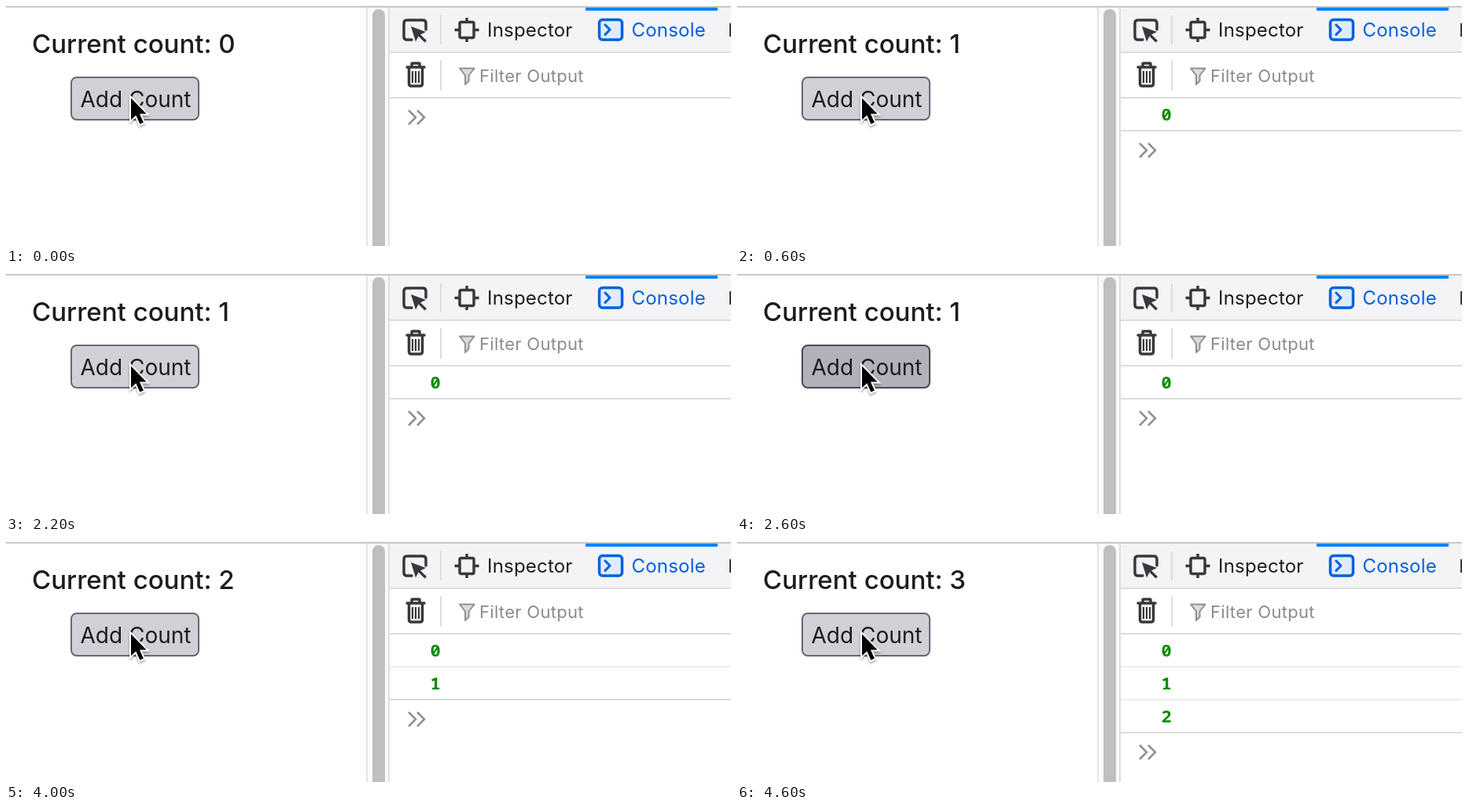
These frames come from a looping animation (922 px wide and 306 px high, 5000 ms). An HTML page:

```html
<!DOCTYPE html>
<html lang="en">
<head>
<meta charset="utf-8">
<title>Counter with console</title>
<style>
  html, body { margin: 0; width: 100%; height: 100%; overflow: hidden; background: #fff; }
  svg { display: block; width: 922px; height: 306px; }
  text { font-family: Inter, sans-serif; fill: #1c1c1f; white-space: pre; }
  .ui { font-size: 24px; letter-spacing: .2px; }
  .log text { font: 600 22px "Noto Sans Mono", monospace; fill: #058b00; }
  .line { fill: none; stroke: #38383d; stroke-width: 3.5; }
  .gray { fill: none; stroke: #8f8f94; stroke-width: 2.5; }
  #button rect { fill: #d0d0d7; stroke: #676774; stroke-width: 2; }
  #button.pressed rect { fill: #b1b1b9; stroke: #484851; }
</style>
</head>
<body>
<svg viewBox="0 0 922 306">
  <!-- page -->
  <text x="33" y="60" font-size="33" font-weight="500">Current count: <tspan id="count">0</tspan></text>
  <g id="button">
    <rect x="83" y="91" width="162" height="54" rx="7"/>
    <text x="94.5" y="129" font-size="28">Add Count</text>
  </g>
  <circle id="ring" cx="158" cy="120" r="42.5" fill="none" stroke="#000" stroke-width="3"/>
  <path d="M159 117.5V145l6.3-5.8 5 11.3 4.6-2-5-11h8.6z" stroke="#fff" stroke-width="4"
    paint-order="stroke" style="filter:drop-shadow(0 2px 1.5px #0005)"/>

  <!-- scrollbar -->
  <path d="M458 2h30v304h-30z" fill="#fafafa"/>
  <path d="M459 2v304" stroke="#e4e4e4" stroke-width="2"/>
  <path d="M487 2v304" stroke="#dedee1" stroke-width="2"/>
  <rect x="466" y="4" width="16" height="320" rx="8" fill="#bfbfbf"/>

  <!-- toolbars -->
  <path d="M488 2h434v56H488z" fill="#f4f4f6"/>
  <path d="M488 59h434M488 117h434M553 12v37M553 69v39" stroke="#dddde0" stroke-width="2"/>
  <path d="M0 1h922" stroke="#c8c8ca" stroke-width="2"/>
  <path d="M737 2h168v4H737z" fill="#0a84ff"/>
  <path d="M920 22h2v17h-2z" fill="#38383d"/>

  <!-- element picker -->
  <path class="line" d="M516 43h-6q-4 0-4-4V22q0-4 4-4h20q4 0 4 4v8" stroke-linecap="round"/>
  <path d="M515 26l19 7-7 3.5 8 7.5-2.5 2.5-8-8-3.5 7z" fill="#38383d"/>
  <!-- inspector -->
  <path class="line" stroke-width="3" d="M579 20.500h14q2 0 2 2v16q0 2-2 2h-14q-2 0-2-2v-16q0-2 2-2zM586 15v5M586 41v5M570.500 30.500h6M595.500 30.500h6"/>
  <text class="ui" x="612" y="39">Inspector</text>
  <!-- console -->
  <g fill="none" stroke="#0060df" stroke-width="3.5">
    <rect x="754.500" y="17.500" width="29" height="25.500" rx="4" fill="#dfecfc"/>
    <path d="M762 24l6 6.200-6 6.200" stroke-width="3" stroke-linecap="round" stroke-linejoin="round"/>
  </g>
  <text class="ui" x="795.500" y="39" style="fill:#0060df">Console</text>
  <!-- trash -->
  <path class="line" stroke-linecap="round" d="M510 78h22M516 77v-3q0-1 1-1h8q1 0 1 1v3M512.500 79v20q0 3 3 3h11q3 0 3-3V79"/>
  <path class="line" style="stroke-width:2.200" d="M517 83v15M521 83v15M525 83v15"/>
  <!-- filter -->
  <path class="gray" style="fill:#dcdce0;stroke-width:2" stroke-linejoin="round" d="M577 79.500h18.500l-7 9v7l-4.500 4.500V88.500z"/>
  <text x="602" y="97" font-size="22" letter-spacing=".3" style="fill:#8c8c90">Filter Output</text>

  <g class="log" id="log"></g>
  <path class="gray" id="prompt" d="M512 133l9 9-9 9M523 133l9 9-9 9"/>
</svg>
<script>
const ROW = 42, LOOP = 5000;
const get = id => document.getElementById(id);
// [press, ring hidden, count changes and release, logged]
const clicks = [[200, 400, 600, 600], [2400, 2600, 2800, 2800], [4200, 4400, 4400, 4600]];

function logRows(n) {
  let rows = '';
  for (let i = 0; i < n; i++) {
    const y = 117 + ROW * (i + 1);
    rows += `<text x="539.5" y="${y - 13}">${i}</text>
      <path d="M488 ${y}h434" stroke="${i < n - 1 ? '#ededf0' : '#dddde0'}" stroke-width="2"/>`;
  }
  return rows;
}

let shown = -1;
function draw() {
  const t = performance.now() % LOOP;
  const within = (from, to) => clicks.some(c => t >= c[from] && t < c[to]);
  const passed = step => clicks.filter(c => t >= c[step]).length;
  const logged = passed(3);

  get('count').textContent = passed(2);
  get('button').classList.toggle('pressed', within(0, 2));
  get('ring').style.display = within(0, 1) ? '' : 'none';
  if (logged !== shown) {
    get('log').innerHTML = logRows(logged);
    get('prompt').setAttribute('transform', `translate(0 ${ROW * logged})`);
    shown = logged;
  }
  requestAnimationFrame(draw);
}
draw();
</script>
</body>
</html>
```
